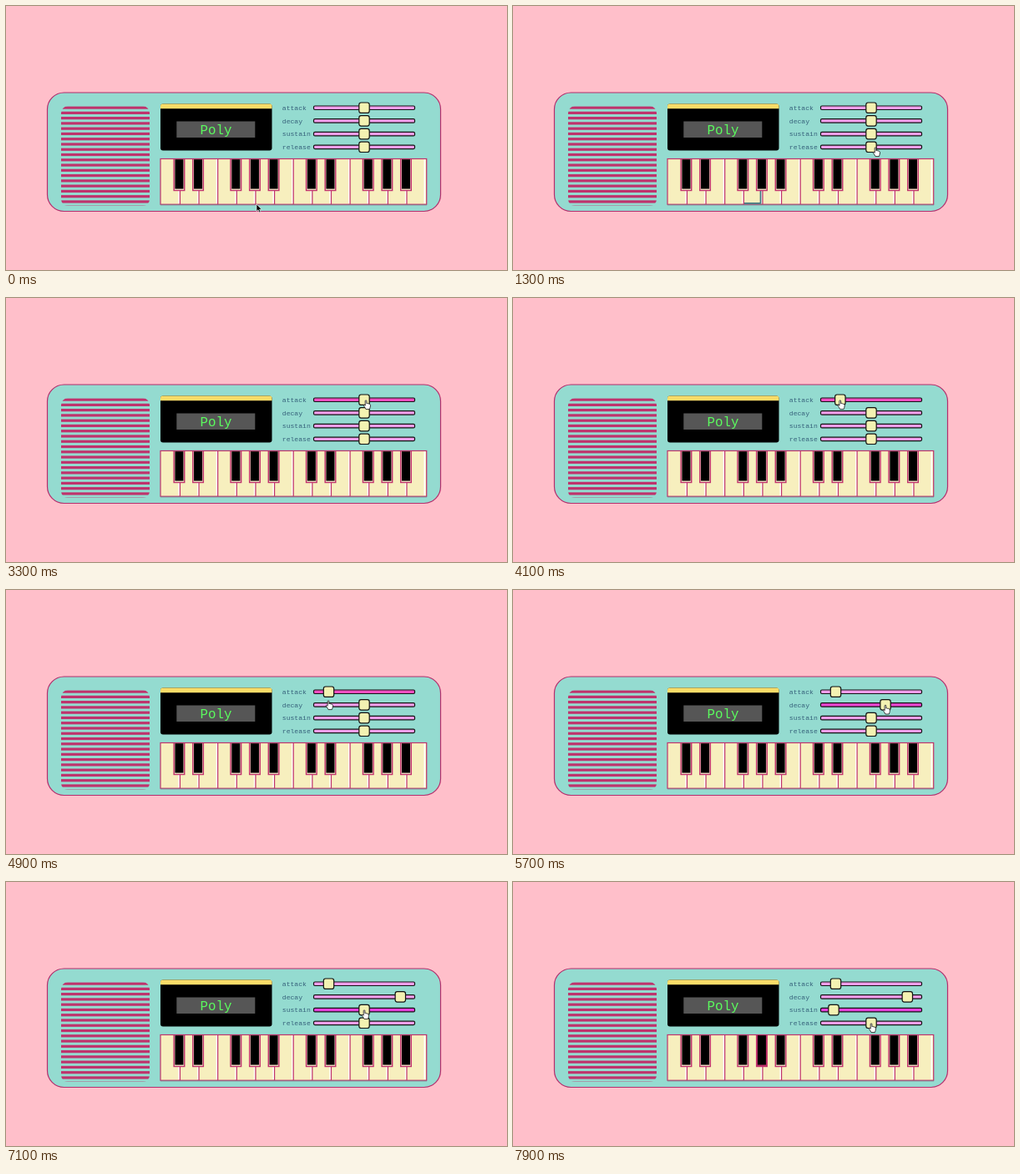
An HTML page for the animation above (8 s loop, 600 px wide and 317 px high).

```html
<!DOCTYPE html>
<html lang="en">
<head>
<meta charset="utf-8">
<title>Toy synth</title>
<style>
  html, body { margin: 0; width: 100%; height: 100%; overflow: hidden; background: #ffbfca; }
  svg { display: block; width: 600px; height: 317px; }
  text { font-family: "Courier New", "Liberation Mono", monospace; }
  .label { font-size: 8.1px; fill: #35607a; }
</style>
</head>
<body>
<svg id="stage" viewBox="0 0 600 317">
  <defs><clipPath id="grille"><rect x="66" y="120.3" width="106" height="119.7" rx="8"/></clipPath></defs>
  <rect x="49.5" y="104" width="471" height="142.5" rx="20" fill="#94dbd0" stroke="#b52d6c" stroke-width="1.2"/>
  <g id="stripes" clip-path="url(#grille)"></g>
  <rect x="185" y="117.5" width="133.5" height="56" rx="3"/>
  <path d="M185 123.2V120a2.5 2.5 0 0 1 2.5-2.5H316a2.5 2.5 0 0 1 2.5 2.5v3.2z" fill="#f9dc68"/>
  <rect x="204.3" y="138.5" width="94" height="19.5" fill="#565656"/>
  <text x="251.4" y="153.7" font-size="15.8" text-anchor="middle" fill="#5bfb5e">Poly</text>
  <g id="sliders"></g>
  <g id="keys"></g>
  <path id="arrow" d="M0 0V8.6L2 6.8L3.5 10L5 9.3L3.6 6.2H6.3z" fill="#000" stroke="#fff" stroke-width=".6"/>
  <path id="hand" d="M-.8 .7C-.8 -.5 .9 -.5 .9 .7V3.8C1.5 3.1 2.4 3.3 2.6 4C3.3 3.5 4.1 3.9 4.2 4.6C4.9 4.3 5.5 4.8 5.5 5.5C5.5 8 5 8.4 4.4 10.6H0C-.5 8.8 -2 7.7 -2.7 6.2C-3 5.2 -1.8 4.9 -.8 6.2z" fill="#fff" stroke="#111" stroke-width=".8"/>
</svg>
<script>
const $ = id => document.getElementById(id);
const PINK = '#bf326c', KEY_W = 22.63, KEYS_X = 185;

function add(parent, tag, attrs) {
  const node = document.createElementNS('http://www.w3.org/2000/svg', tag);
  for (const k in attrs) node.setAttribute(k, attrs[k]);
  return parent.appendChild(node);
}
const box = (parent, x, y, width, height, fill, more) =>
  add(parent, 'rect', { x, y, width, height, fill, ...more });

for (let i = 0; i < 20; i++) box($('stripes'), 66, 120.5 + i * 6.27, 106, 3.2, PINK);

const sliders = ['attack', 'decay', 'sustain', 'release'].map((name, i) => {
  const y = 122.2 + i * 15.7;
  add($('sliders'), 'text', { x: 330.8, y: y + 2.8, class: 'label' }).textContent = name;
  const ink = { stroke: '#111', 'stroke-width': 1.2 };
  const track = box($('sliders'), 368.5, y - 2.2, 121, 4.5, '#f29eeb', { rx: 1.5, ...ink });
  const thumb = box($('sliders'), 0, y - 6.2, 12.4, 12.4, '#f3f2b2', { rx: 2.5, ...ink });
  return { track, thumb };
});

// White keys, then the pressed white key's edge, then black keys
const keys = $('keys');
box(keys, KEYS_X, 183.5, 318.5, 55, '#f7efbe');
for (let i = 1; i <= 14; i++) {
  const x = KEYS_X + KEY_W * i;
  box(keys, x - 1.3, 184, 1.6, 53, '#fff');
  if (i < 14) box(keys, x + .2, 184, 1.2, 54, PINK);
}
box(keys, KEYS_X, 183.5, 318.7, 54.7, 'none', { stroke: PINK, 'stroke-width': 1.2 });
box(keys, KEYS_X, 238.3, 319, 1, '#8b6a86');
const whiteEdge = add(keys, 'path', {
  d: 'M277 236.8H296.5V222', fill: 'none', stroke: '#3d7781', 'stroke-width': 1.7
});
const blacks = [1, 2, 4, 5, 6, 8, 9, 11, 12, 13].map(n => {
  const x = KEYS_X + KEY_W * n - 7.2;
  box(keys, x, 183.5, 14, 38.7, PINK);
  const shine = box(keys, x + 1.4, 184.2, 11.2, 36.8, '#eed3bd');
  box(keys, x + 2, 184.2, 10, 35.3, '#000');
  return shine;
});

const pointer = [
  [0, 300, 238], [300, 303, 258], [600, 303, 255], [1100, 434, 170], [2600, 434, 170],
  [3100, 431, 123], [3400, 431, 123], [4300, 386, 123], [4600, 386, 123], [4900, 386, 133],
  [5200, 429, 137], [5400, 429, 138], [6100, 472, 139], [6500, 472, 139], [7000, 429, 154],
  [7100, 429, 154], [7500, 384, 154], [7600, 384, 154], [7900, 429, 170]
];
const drags = [
  { from: 3400, to: 4300, x: 386.5, focus: 3200, blur: 5200, color: '#f04fc1' },
  { from: 5400, to: 6100, x: 472.3, focus: 5200, blur: 6900, color: '#ec45d2' },
  { from: 7100, to: 7500, x: 384, focus: 6900, blur: 8000, color: '#e642dc' }
];

function ease(t, a, b) {
  const p = Math.max(0, Math.min(1, (t - a) / (b - a)));
  return p * p * (3 - 2 * p);
}
const within = (t, a, b) => t >= a && t < b;
const show = (node, on) => node.setAttribute('visibility', on ? 'visible' : 'hidden');

function draw(t) {
  sliders.forEach(({ track, thumb }, i) => {
    const d = drags[i];
    const x = d ? 429 + (d.x - 429) * ease(t, d.from, d.to) : 429;
    thumb.setAttribute('x', x - 6.2);
    track.setAttribute('fill', d && within(t, d.focus, d.blur) ? d.color : '#f29eeb');
  });

  show(whiteEdge, within(t, 1200, 1500));
  blacks.forEach((shine, i) => {
    const down = i === 1 && within(t, 6300, 6600) || i === 3 && t >= 7800;
    shine.setAttribute('fill', down ? PINK : '#eed3bd');
  });

  let [, x, y] = pointer[0];
  for (let i = 1; i < pointer.length; i++) {
    const [a] = pointer[i - 1], [b, nx, ny] = pointer[i], p = ease(t, a, b);
    x += (nx - x) * p;
    y += (ny - y) * p;
  }
  const overSliders = t >= 1000;
  show($('arrow'), !overSliders);
  show($('hand'), overSliders);
  $(overSliders ? 'hand' : 'arrow').setAttribute('transform', `translate(${x} ${y})`);
}

const start = performance.now();
function tick() {
  const t = (performance.now() - start) % 8000;
  draw(Math.floor(t / 100) * 100);
  requestAnimationFrame(tick);
}
tick();
</script>
</body>
</html>
```
